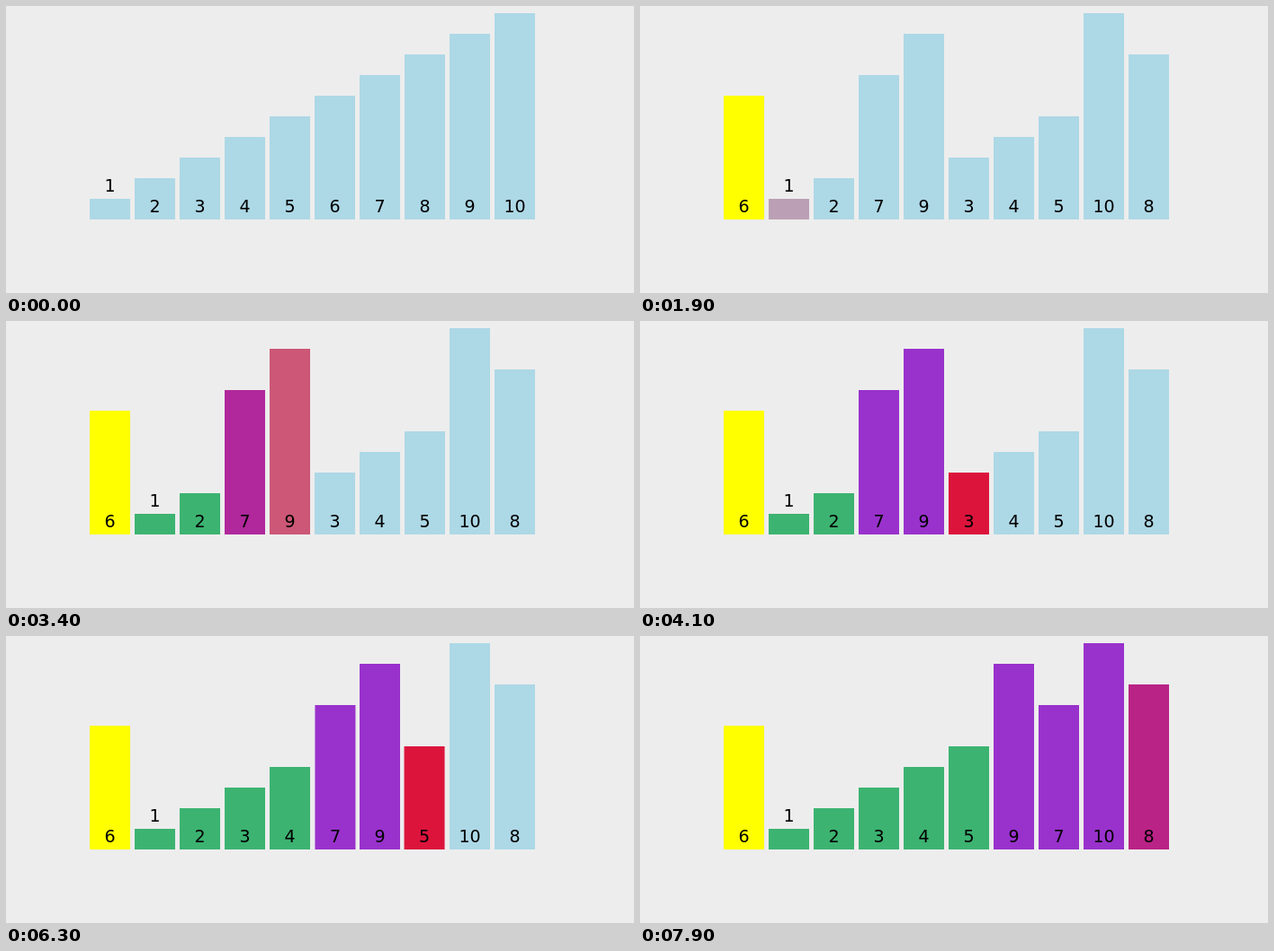
An HTML page for the animation above (8 s loop, 698x320 px).

```html
<!DOCTYPE html>
<html lang="en">
<head>
<meta charset="utf-8">
<title>Quick sort</title>
<style>
  html, body { margin: 0; width: 100%; height: 100%; overflow: hidden; background: #ededed; }
  svg { display: block; }
  text { font: 19px "DejaVu Sans", sans-serif; text-anchor: middle; fill: #000; }
</style>
</head>
<body>
<svg id="stage" width="698" height="320" viewBox="0 0 698 320"></svg>
<script>
const LOOP = 8000, STEP = 250;
const LEFT = 93, PITCH = 50, WIDTH = 45, UNIT = 23, BASE = 238;
const SHUFFLE = { at: 60, ms: 500 };
const values = [6, 1, 2, 7, 9, 3, 4, 5, 10, 8];

const colors = {
  idle: [173, 216, 230],
  pivot: [255, 255, 0],
  active: [220, 20, 60],
  low: [60, 179, 113],
  high: [153, 50, 204]
};

// Each step: start time, then value -> new colour name or new slot
const steps = [
  [1297, { 6: 'pivot' }],
  [1797, { 1: 'active' }],
  [2285, { 1: 'low', 2: 'active' }],
  [2773, { 2: 'low', 7: 'active' }],
  [3261, { 7: 'high', 9: 'active' }],
  [3770, { 9: 'high', 3: 'active' }],
  [4270, { 3: 3, 7: 5 }],
  [4770, { 3: 'low', 4: 'active' }],
  [5270, { 4: 4, 9: 6 }],
  [5770, { 4: 'low', 5: 'active' }],
  [6275, { 5: 5, 7: 7 }],
  [6770, { 5: 'low', 10: 'active' }],
  [7270, { 10: 'high', 8: 'active' }],
  [7775, { 8: 'high' }]
];

const stage = document.getElementById('stage');
const add = (tag, parent) =>
  parent.appendChild(document.createElementNS('http://www.w3.org/2000/svg', tag));

const bars = values.map((value, slot) => {
  const group = add('g', stage);
  const rect = add('rect', group);
  rect.setAttribute('width', WIDTH);
  const label = add('text', group);
  label.setAttribute('x', WIDTH / 2);
  return { value, slot, group, rect, label };
});

const mix = (a, b, k) => a + (b - a) * k;

// Cubic ease in and out
function ease(t, at, ms) {
  const u = Math.min(1, Math.max(0, (t - at) / ms));
  return u < 0.5 ? 4 * u ** 3 : 1 - 4 * (1 - u) ** 3;
}

const labelY = value => value === 1 ? 207 : 230;

function draw(t) {
  const grown = ease(t, SHUFFLE.at, SHUFFLE.ms);
  for (const { value, slot, group, rect, label } of bars) {
    const first = slot + 1;
    let x = slot, color = colors.idle;
    for (const [at, changes] of steps) {
      const to = changes[value];
      if (to === undefined || t <= at) continue;
      const k = ease(t, at, STEP);
      if (typeof to === 'number') x = mix(x, to, k);
      else color = color.map((c, i) => mix(c, colors[to][i], k));
    }
    const height = UNIT * mix(first, value, grown);
    group.setAttribute('transform', `translate(${LEFT + PITCH * x} 0)`);
    rect.setAttribute('y', BASE - height);
    rect.setAttribute('height', height);
    rect.setAttribute('fill', `rgb(${color.map(Math.round)})`);
    label.setAttribute('y', mix(labelY(first), labelY(value), grown));
    label.textContent = t < SHUFFLE.at ? first : value;
  }
}

const start = performance.now();
function tick() {
  draw((performance.now() - start) % LOOP);
  requestAnimationFrame(tick);
}
tick();
</script>
</body>
</html>
```
